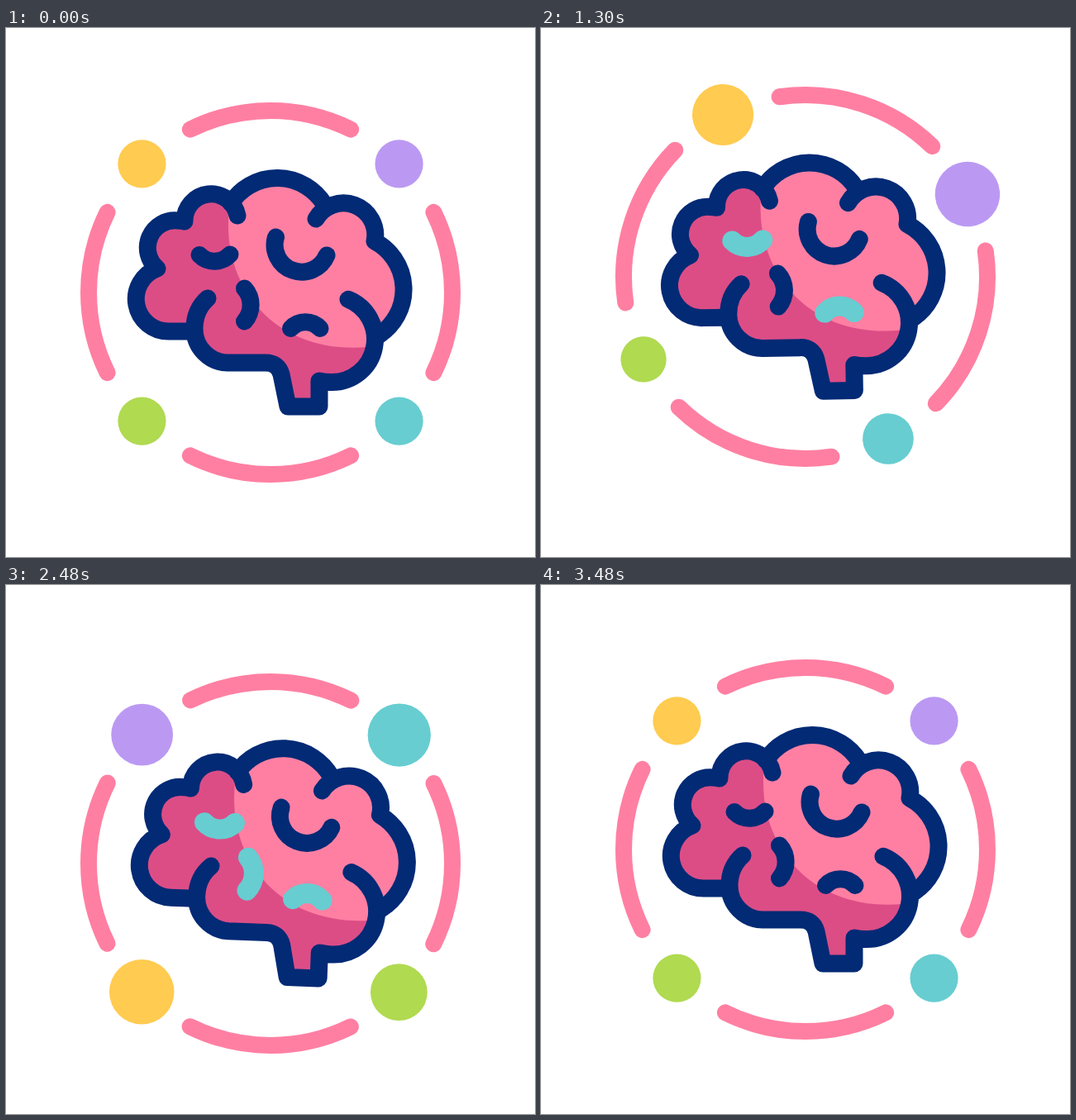
Animation of 640 by 640 pixels, one loop 3600 ms. Source, as an HTML page:

```html
<!DOCTYPE html>
<html lang="en">
<head>
<meta charset="utf-8">
<title>Brain</title>
<style>
html, body { margin: 0; width: 100%; height: 100%; overflow: hidden; background: #fff; }
svg { display: block; width: 100vw; height: 100vh; }
.line { fill: none; stroke-linecap: round; stroke-linejoin: round; }
#ring { stroke-width: 20; }
#brain { stroke-width: 21; }
</style>
</head>
<body>
<svg viewBox="0 0 640 640">
  <defs>
    <clipPath id="shape">
      <path d="M228 364A41 41 0 0 0 268 405H314Q329 405 333 419L341 458H379V427L394.5 428.5A52 52 0 0 0 446 376L452 371A66 66 0 0 0 446 258A38.5 38.5 0 0 0 385 219V213A67 67 0 0 0 272 212A32.3 32.3 0 0 0 216 234L208 233A33 33 0 0 0 183 291A39.2 39.2 0 0 0 197 367H228Z"/>
    </clipPath>
  </defs>
  <g id="ring"></g>
  <g id="brain">
    <g clip-path="url(#shape)">
      <rect x="140" y="160" width="360" height="320" fill="#dc4d86"/>
      <path d="M269 150V240C269 320 330 395 437 386H500V150Z" fill="#ff7fa2"/>
    </g>
    <g class="line" stroke="#022a75">
      <path d="M244 327Q228 341 228 364A41 41 0 0 0 268 405H314Q329 405 333 419L341 458H379V427Q385 428.5 394.5 428.5A52 52 0 0 0 414 328.3"/>
      <path d="M375 231A38.5 38.5 0 0 1 446 258A66 66 0 0 1 452 371"/>
      <path d="M272 212A67 67 0 0 1 385 213"/>
      <path d="M280 227A32.3 32.3 0 0 0 216 234Q212 233 208 233A33 33 0 0 0 183 291A39.2 39.2 0 0 0 197 367H226"/>
    </g>
    <g id="marks" class="line"></g>
  </g>
</svg>
<script>
const LOOP = 3600, STEP = 20;
const ring = document.getElementById('ring');
const brain = document.getElementById('brain');
const marksBox = document.getElementById('marks');

function add(parent, tag, attrs) {
  const el = document.createElementNS('http://www.w3.org/2000/svg', tag);
  for (const k in attrs) el.setAttribute(k, attrs[k]);
  return parent.appendChild(el);
}

const clamp = v => Math.max(0, Math.min(1, v));

// cubic-bezier(.42, 0, .58, 1), solved by bisection
function ease(x) {
  let lo = 0, hi = 1;
  for (let i = 0; i < 24; i++) {
    const u = (lo + hi) / 2;
    if (u * (1.26 + u * (0.52 * u - 0.78)) < x) lo = u; else hi = u;
  }
  return lo * lo * (3 - 2 * lo);
}

// Eased moves between [time, value] keys
const track = (...keys) => t => keys.slice(1).reduce((v, [time, value], i) =>
  v + (value - keys[i][1]) * ease(clamp((t - keys[i][0]) / (time - keys[i][0]))), keys[0][1]);

const lift = track([100, 0], [1130, -20.5], [2350, 17.5], [3350, 0]);
const spin = track([140, 0], [674, -24], [3390, 360]);
const tilt = track([140, 0], [860, -2.9], [1950, 2.8], [3480, 0]);
const pulse = track([160, 1], [720, 1.35], [1315, 0.95], [2100, 1.35], [2880, 1]);

const R = 220, half = 26.2 * Math.PI / 180;
const ax = R * Math.sin(half), ay = -R * Math.cos(half);
for (let i = 0; i < 4; i++) {
  add(ring, 'path', {
    class: 'line', stroke: '#ff7fa2', transform: `rotate(${i * 90})`,
    d: `M${-ax} ${ay}A${R} ${R} 0 0 1 ${ax} ${ay}`
  });
}

const dots = [
  ['#b0da50', -1, 1],
  ['#67cdd1', 1, 1],
  ['#ffcb50', -1, -1],
  ['#bb99f3', 1, -1]
].map(([fill, x, y]) =>
  add(ring, 'circle', { fill, cx: x * R * Math.SQRT1_2, cy: y * R * Math.SQRT1_2 }));

// Folds of the brain and the beats on which each lights up
const BEAT_START = 400, BEAT = 540, FADE = 60;
const marks = [
  ['M326.5 253A32.7 32.7 0 0 0 388 275', [0, 2, 4]],
  ['M234 274.5A25.5 25.5 0 0 0 271 274', [1, 3]],
  ['M288.5 315A30 30 0 0 1 288.5 355', [3, 4]],
  ['M344.5 363.5A24 24 0 0 1 380 363.5', [1, 3]]
].map(([d, beats]) => {
  add(marksBox, 'path', { d, stroke: '#022a75' });
  return { beats, el: add(marksBox, 'path', { d, stroke: '#67cdd1' }) };
});

const glow = (beats, t) => clamp(beats.reduce((sum, b) => {
  const dt = t - BEAT_START - b * BEAT;
  return sum + clamp(Math.min(dt, BEAT - dt) / FADE + 0.5);
}, 0));

function draw(t) {
  const y = lift(t);
  ring.setAttribute('transform', `translate(320 ${320 + y}) rotate(${spin(t)})`);
  brain.setAttribute('transform', `translate(0 ${y}) rotate(${tilt(t)} 352 435)`);
  dots.forEach((dot, i) => dot.setAttribute('r', 29.1 * pulse(t - i * 200)));
  for (const { el, beats } of marks) {
    const g = glow(beats, t);
    el.setAttribute('opacity', g);
    el.setAttribute('stroke-width', 21 + 3 * g);
  }
}

const start = performance.now();
function tick() {
  const t = (performance.now() - start) % LOOP;
  draw(Math.floor(t / STEP) * STEP);
  requestAnimationFrame(tick);
}
tick();
</script>
</body>
</html>
```
